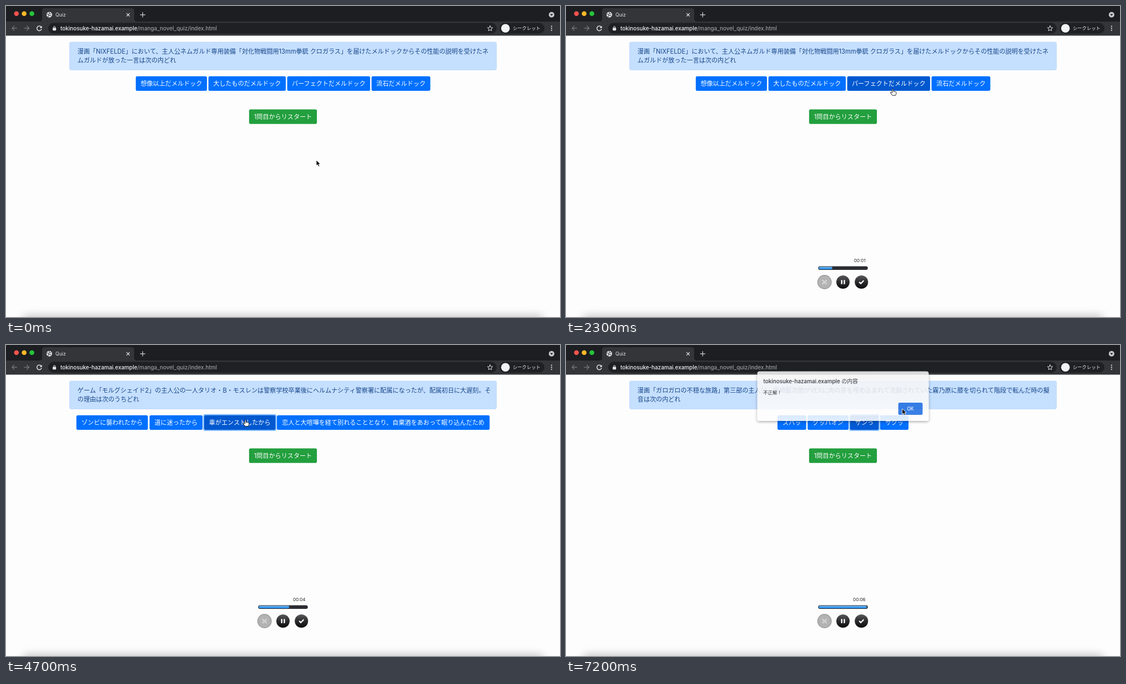
Write an HTML page that moves like this. It is 998x561 px and loops after 7300 ms.

```html
<!DOCTYPE html>
<html lang="ja">
<head>
<meta charset="utf-8">
<title>Quiz</title>
<style>
html, body { margin: 0; width: 100%; height: 100%; overflow: hidden; background: #fdfdfd; }
svg { display: block; width: 998px; height: 561px; }
text { font-family: Inter, "Noto Sans CJK JP", "Noto Sans CJK", sans-serif; white-space: pre; }
.body { font-size: 11.1px; }
.mid { text-anchor: middle; }
.line { fill: none; stroke-linecap: round; stroke-linejoin: round; }
</style>
</head>
<body>
<svg viewBox="0 0 998 561" xmlns="http://www.w3.org/2000/svg">
  <defs>
    <linearGradient id="dark" x2="0" y2="1">
      <stop offset="0" stop-color="#5a5a5d"/><stop offset=".5" stop-color="#2b2b2d"/><stop offset="1" stop-color="#0c0c0d"/>
    </linearGradient>
    <linearGradient id="blue" x2="0" y2="1">
      <stop offset="0" stop-color="#7cc4fa"/><stop offset="1" stop-color="#1580e6"/>
    </linearGradient>
    <linearGradient id="sheet" x2="0" y2="1">
      <stop offset="0" stop-color="#f4f4f4"/><stop offset="1" stop-color="#fff"/>
    </linearGradient>
    <filter id="soft" x="-10%" y="-300%" width="120%" height="700%"><feGaussianBlur stdDeviation="8"/></filter>
    <filter id="shade" x="-10%" y="-20%" width="120%" height="150%">
      <feDropShadow dx="0" dy="1.5" stdDeviation="2.5" flood-opacity=".4"/>
    </filter>
  </defs>

  <rect width="998" height="561" fill="#fdfdfd"/>
  <rect x="30" y="559" width="938" height="14" rx="7" fill="#000" opacity=".26" filter="url(#soft)"/>

  <!-- browser frame -->
  <rect width="998" height="30" fill="#1d1e22"/>
  <rect y="28" width="998" height="25.5" fill="#333539"/>
  <path d="M60 28q5 0 5-5V9q0-5 5-5h156q5 0 5 5v14q0 5 5 5z" fill="#333539"/>
  <circle cx="18.8" cy="13.7" r="4.3" fill="#f9544d"/>
  <circle cx="32.7" cy="13.7" r="4.3" fill="#fcb827"/>
  <circle cx="46.6" cy="13.7" r="4.3" fill="#25c53b"/>
  <circle cx="78" cy="15.8" r="5" fill="#f0f1f2"/>
  <path d="M74.3 14.4l3 1.3-.2 2-1.5 1.4M78 11.8l.2 2 2.6.3M79 17l2 .8" class="line" stroke="#44464a" stroke-width="1.4"/>
  <text x="89" y="19" font-size="8.7" fill="#e6e7e9">Quiz</text>
  <path d="M217.4 13.4l5 5m0-5l-5 5" class="line" stroke="#e6e7e9" stroke-width="1.2"/>
  <path d="M242 15.9h8.4M246.2 11.7v8.4" class="line" stroke="#d5d7da" stroke-width="1.2"/>
  <circle cx="982.8" cy="15.8" r="5" fill="#c6c8cb"/>
  <path d="M980.2 14.6h5.2l-2.6 3.2z" fill="#1d1e22"/>
  <g class="line" stroke-width="1.2">
    <path d="M19.5 40.2h-8.6m4-4l-4 4 4 4M33 40.2h8.6m-4-4l4 4-4 4" stroke="#7c7e82"/>
    <path d="M63.6 38.3a4.2 4.2 0 1 0 .2 3.6" stroke="#eef0f1" stroke-width="1.4"/>
  </g>
  <path d="M64.6 35.7v4h-4z" fill="#eef0f1"/>
  <rect x="76" y="30.6" width="808" height="19.4" rx="9.7" fill="#1f2024"/>
  <rect x="84.2" y="39.3" width="6" height="4.9" rx=".7" fill="#e6e7e9"/>
  <path d="M85.6 39.4v-1a1.6 1.6 0 0 1 3.2 0v1" class="line" stroke="#e6e7e9"/>
  <text x="98" y="43.8" font-size="9.9" font-weight="500" fill="#f1f2f3">tokinosuke-hazamai.example<tspan fill="#9a9da1">/manga_novel_quiz/index.html</tspan></text>
  <path d="M872 35.6l1.3 3.2 3.4.3-2.6 2.2.8 3.4-2.9-1.8-2.9 1.8.8-3.4-2.6-2.2 3.4-.3z" class="line" stroke="#dcdee0" stroke-width="1"/>
  <rect x="889" y="30.6" width="81" height="19.4" rx="9.7" fill="#1f2024"/>
  <circle cx="899.7" cy="40.3" r="7.8" fill="#f1f3f4"/>
  <text x="913" y="43.4" font-size="8.3" fill="#f1f2f3">シークレット</text>
  <g fill="#e6e7e9"><circle cx="982.8" cy="36.6" r="1.1"/><circle cx="982.8" cy="40.2" r="1.1"/><circle cx="982.8" cy="43.8" r="1.1"/></g>

  <!-- page -->
  <rect x="114.4" y="65" width="769.2" height="50.4" rx="2.8" fill="#c5dfff" stroke="#b5d5fd" stroke-width=".7"/>
  <g id="quiz"></g>
  <rect x="437.9" y="186.4" width="122.2" height="26.4" rx="2.8" fill="#239f3e"/>
  <text x="499" y="203.6" class="body mid" fill="#fff">1問目からリスタート</text>

  <!-- player -->
  <g id="player">
    <text id="clock" x="539.5" y="462" font-size="8" text-anchor="end" fill="#222"></text>
    <rect x="454.3" y="469.4" width="89.4" height="6.6" rx="3.3" fill="#2c2d32"/>
    <rect id="bar" x="455.3" y="470.4" height="4.6" rx="2.1" fill="url(#blue)"/>
    <circle cx="465.7" cy="498" r="12.2" fill="#b3b3b3" stroke="#9c9c9c" stroke-width="1.4"/>
    <path d="M462.6 494.9l6.2 6.2m0-6.2l-6.2 6.2" class="line" stroke="#d0d0d0" stroke-width="2.8"/>
    <circle cx="499" cy="498" r="12" fill="url(#dark)"/>
    <path d="M496.7 494.3v7.4M501.4 494.3v7.4" stroke="#fff" stroke-width="2.4"/>
    <circle cx="532.2" cy="498" r="12" fill="url(#dark)"/>
    <path d="M528.2 497.9l2.9 2.8 5.2-5.4" fill="none" stroke="#fff" stroke-width="2.3"/>
  </g>

  <!-- alert -->
  <g id="dialog">
    <rect id="panel" x="344" y="51" width="310" height="89.5" rx="4" filter="url(#shade)"/>
    <text x="355" y="72.6" font-size="9.9" font-weight="500" fill="#222">tokinosuke-hazamai.example の内容</text>
    <text id="verdict" x="355" y="92.6" font-size="8.3" fill="#222"></text>
    <rect x="599" y="107.5" width="44" height="22" rx="2.8" fill="#1f6ee2"/>
    <text x="621" y="121.5" class="mid" font-size="8.3" font-weight="500" fill="#fff">OK</text>
  </g>

  <g id="cursor">
    <path id="arrow" d="M0 0v10.2l2.4-2.2 1.6 3.7 1.9-.8-1.6-3.6h3.2z" fill="#000" stroke="#fff" stroke-width=".9" stroke-linejoin="round"/>
    <path id="hand" d="M-1 .9Q0-.6 1 .9V4.2l4 .8q1.6.4 1.4 2l-.7 2.6-.9 1.9H-.7L-3.8 7.4q-1.2-1.7.3-2L-1 7z" fill="#fff" stroke="#111" stroke-width=".9" stroke-linejoin="round"/>
  </g>
</svg>

<script>
const LOOP = 7300, NORMAL = [0, 112, 255], HOVER = [0, 88, 207];
const $ = id => document.getElementById(id);

// from: start time; buttons: [x, width, label]
const questions = [
  { from: 0,
    lines: ['漫画「NIXFELDE」において、主人公ネムガルド専用装備「対化物戦闘用13mm拳銃 クロガラス」を届けたメルドックからその性能の説明を受けたネ',
            'ムガルドが放った一言は次の内どれ'],
    buttons: [[233.8, 128.2, '想像以上だメルドック'], [364.7, 139.3, '大したものだメルドック'],
              [506.6, 149.3, 'パーフェクトだメルドック'], [658.5, 105.9, '流石だメルドック']] },
  { from: 3650,
    lines: ['ゲーム「モルグシェイド2」の主人公の一人タリオ・B・モスレンは警察学校卒業後にヘルムナシティ警察署に配属になったが、配属初日に大遅刻。そ',
            'の理由は次のうちどれ'],
    buttons: [[126.8, 128.8, 'ゾンビに襲われたから'], [258.6, 95.5, '道に迷ったから'],
              [357, 128.4, '車がエンストしたから'], [488, 383.2, '恋人と大喧嘩を経て別れることとなり、自棄酒をあおって眠り込んだため']] },
  { from: 7150,
    lines: ['漫画「ガロガロの不穏な旅路」第三部の主人公、里崎銀次朗がVEXに肉の芽を埋め込まれて洗脳されていた霧乃原に膝を切られて階段で転んだ時の擬',
            '音は次の内どれ'],
    buttons: [[381, 51.7, 'ズバッ'], [435.3, 73.7, 'グッパオン'], [511.8, 51.4, 'ザンっ'], [565.8, 51.2, 'サクッ']] }
];

const alerts = [
  { open: 2400, close: 3650, text: '正解！' },
  { open: 5850, close: 7180, text: '不正解！' }
];

const path = [
  [0, 559, 278], [300, 559, 278], [1300, 588.7, 149.8], [2500, 588.7, 149.8], [3100, 609.5, 121],
  [4000, 609.5, 121], [4600, 431.5, 135], [5200, 431.5, 135], [5600, 427.5, 138],
  [6150, 427.5, 138], [6900, 605.7, 115], [LOOP, 605.7, 115]
];

const clamp = v => Math.max(0, Math.min(1, v));
const ease = v => v * v * (3 - 2 * v);
const mix = (a, b, k) => a + (b - a) * k;
const shade = k => `rgb(${NORMAL.map((c, i) => Math.round(mix(c, HOVER[i], k)))})`;

function add(parent, tag, attrs, text = '') {
  const el = document.createElementNS('http://www.w3.org/2000/svg', tag);
  for (const key in attrs) el.setAttribute(key, attrs[key]);
  el.textContent = text;
  return parent.appendChild(el);
}

for (const q of questions) {
  q.el = add($('quiz'), 'g', {});
  q.lines.forEach((s, i) => add(q.el, 'text', { x: 128.8, y: 85.7 + i * 16.7, class: 'body', fill: '#174789' }, s));
  q.rects = q.buttons.map(([x, width, label], i) => {
    if (i === 2 && q.from) add(q.el, 'rect', { x: x - 2, y: 124.7, width: width + 4, height: 30.4, rx: 4, fill: '#86bdff' });
    const rect = add(q.el, 'rect', { x, y: 126.7, width, height: 26.4, rx: 2.8 });
    add(q.el, 'text', { x: x + width / 2, y: 144, class: 'body mid', fill: '#fff' }, label);
    return rect;
  });
}

function pointer(t) {
  const i = path.findIndex(p => p[0] > t);
  const [t0, x0, y0] = path[i - 1], [t1, x1, y1] = path[i];
  const k = ease((t - t0) / (t1 - t0));
  return [mix(x0, x1, k), mix(y0, y1, k)];
}

function draw(t) {
  const [x, y] = pointer(t);
  const alert = alerts.find(a => t >= a.open && t < a.close + 150);
  const current = questions.filter(q => q.from <= t).pop();
  const over = !alert && y >= 127 && y <= 153
    ? current.buttons.findIndex(([bx, w]) => x >= bx && x <= bx + w) : -1;

  for (const q of questions) q.el.style.display = q === current ? '' : 'none';
  current.rects.forEach((rect, i) => {
    let k = i === over ? 1 : 0;
    if (i === 2 && (current.from || alert)) k = Math.max(k, .9);
    if (i === 3 && current === questions[1]) k = Math.max(k, .4 * clamp((4050 - t) / 150));
    rect.setAttribute('fill', shade(k));
  });

  $('dialog').style.display = alert ? '' : 'none';
  if (alert) {
    const closing = t >= alert.close;
    const p = closing ? (alert.close + 150 - t) / 150 : clamp((t - alert.open) / 180);
    const lift = (closing ? 26 : 12) * (1 - p);
    const s = 1 - .03 * (1 - p);
    $('dialog').setAttribute('opacity', p);
    $('dialog').setAttribute('transform', `translate(499 ${95 - lift}) scale(${s} 1) translate(-499 -95)`);
    $('panel').setAttribute('fill', p < 1 ? 'url(#sheet)' : '#fff');
    $('verdict').textContent = alert.text;
  }

  $('player').setAttribute('opacity', clamp((t - 200) / 300));
  $('bar').setAttribute('width', Math.max(0, 17 + (t - 1700) * .01264));
  $('clock').textContent = '00:0' + Math.max(0, Math.floor((t - 400) / 1000));

  $('cursor').setAttribute('transform', `translate(${x} ${y})`);
  $('hand').style.display = over < 0 ? 'none' : '';
  $('arrow').style.display = over < 0 ? '' : 'none';
}

const start = performance.now();
function tick() {
  const t = (performance.now() - start) % LOOP;
  draw(Math.floor(t / 100) * 100);
  requestAnimationFrame(tick);
}
draw(0);
requestAnimationFrame(tick);
</script>
</body>
</html>
```
